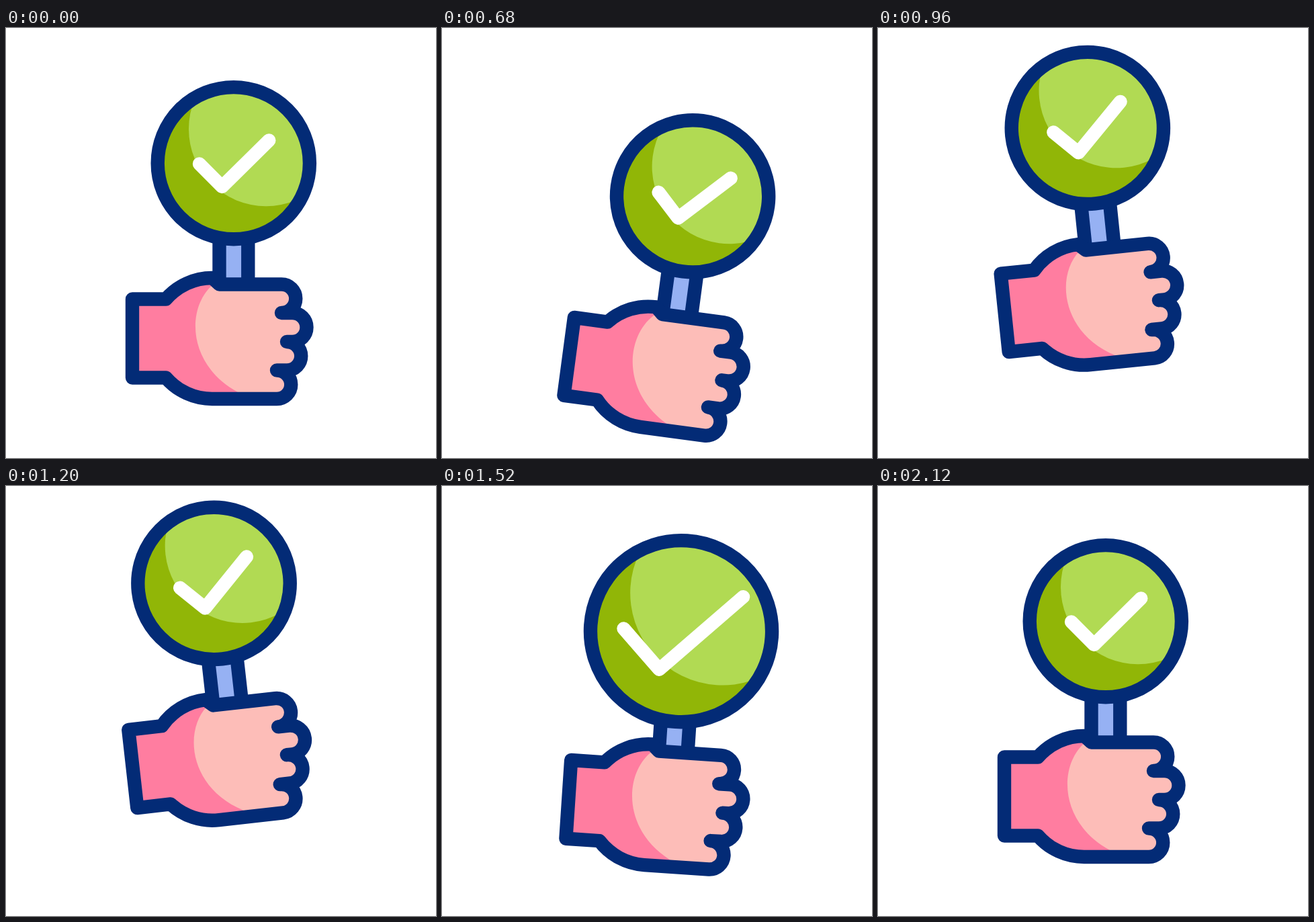
These frames come from a looping animation (640x640 px, 2.16 s). An HTML page:

```html
<!DOCTYPE html>
<html lang="en">
<head>
<meta charset="utf-8">
<title>Approved</title>
<style>
  html, body { margin: 0; width: 100%; height: 100%; overflow: hidden; background: #fff; }
  svg { display: block; width: 100vw; height: 100vh; }
  .line { fill: none; stroke: #032b76; stroke-width: 20.4; stroke-linecap: round; stroke-linejoin: round; }
</style>
</head>
<body>
<svg viewBox="0 0 640 640">
  <defs>
    <path id="fist" d="M188 403.5H238A91 91 0 0 1 307 372L317.5 381.5H410
      A21.25 21.25 0 0 1 410 424H426A21.5 21.5 0 0 1 426 467H418
      A21.25 21.25 0 0 1 418 509.5H403A21.25 21.25 0 0 1 403 552H307
      A91 91 0 0 1 238 520.5H188Z"/>
    <clipPath id="inFist"><use href="#fist"/></clipPath>
    <clipPath id="inDisc"><circle r="113"/></clipPath>
  </defs>
  <g id="sign">
    <path d="M317.5 300H360.3V381.5H317.5Z" fill="#96b1f3"/>
    <path class="line" d="M317.5 300V381.5M360.3 300V381.5"/>
    <use href="#fist" fill="#ff7da0"/>
    <path clip-path="url(#inFist)" fill="#fdbdb8" d="M308 382C269 415 268 500 345 542L362 552H470V370H320Z"/>
    <use href="#fist" class="line"/>
    <g transform="translate(338.8 201.2)">
      <g id="disc">
        <circle r="113" fill="#91b607"/>
        <circle cx="48.2" cy="-51" r="115" fill="#b1da53" clip-path="url(#discWindow)"/>
        <g clip-path="url(#inDisc)"><circle cx="48.2" cy="-51" r="115" fill="#b1da53"/></g>
        <circle id="rim" class="line" r="113.1"/>
      </g>
      <path id="tick" class="line" style="stroke:#fff" d="M-51 1L-17.2 35L52.7 -34"/>
    </g>
  </g>
</svg>
<script>
const LOOP = 2160, STEP = 40;
const PIVOT = '317.5 462';

// Rows: time in ms, then values
const pose = [[167, 0, 0], [624, 7.95, 46.5], [1084, -7.9, -65.5], [1512, 3.8, 13], [2110, 0, 0]];
const discSize = [[1180, 1], [1540, 1.195], [2110, 1]];
const tickSize = [[1300, 1], [1940, 4.12], [2110, 1]];

const get = id => document.getElementById(id);
const sign = get('sign'), disc = get('disc'), rim = get('rim'), tick = get('tick');

// cubic-bezier(.5, 0, .5, 1)
function ease(x) {
  let lo = 0, hi = 1;
  for (let i = 0; i < 24; i++) {
    const mid = (lo + hi) / 2;
    if (1.5 * mid * (1 - mid) + mid ** 3 < x) lo = mid; else hi = mid;
  }
  return lo * lo * (3 - 2 * lo);
}

function sample(keys, t) {
  if (t <= keys[0][0]) return keys[0].slice(1);
  const i = keys.findIndex(key => key[0] > t);
  if (i < 0) return keys[keys.length - 1].slice(1);
  const [from, to] = [keys[i - 1], keys[i]];
  const p = ease((t - from[0]) / (to[0] - from[0]));
  return from.slice(1).map((v, n) => v + (to[n + 1] - v) * p);
}

// Scales a shape while its line keeps the same weight
function resize(group, line, size, weight) {
  group.setAttribute('transform', `scale(${size})`);
  line.style.strokeWidth = weight / size;
}

function draw(now) {
  const t = Math.floor((now % LOOP) / STEP) * STEP;
  const [angle, drop] = sample(pose, t);
  sign.setAttribute('transform', `translate(0 ${drop}) rotate(${angle} ${PIVOT})`);
  resize(disc, rim, sample(discSize, t)[0], 20.4);
  resize(tick, tick, sample(tickSize, t)[0], 20);
}

const start = performance.now();
function loop() {
  draw(performance.now() - start);
  requestAnimationFrame(loop);
}
disc.querySelector('[clip-path="url(#discWindow)"]').remove();
loop();
</script>
</body>
</html>
```
